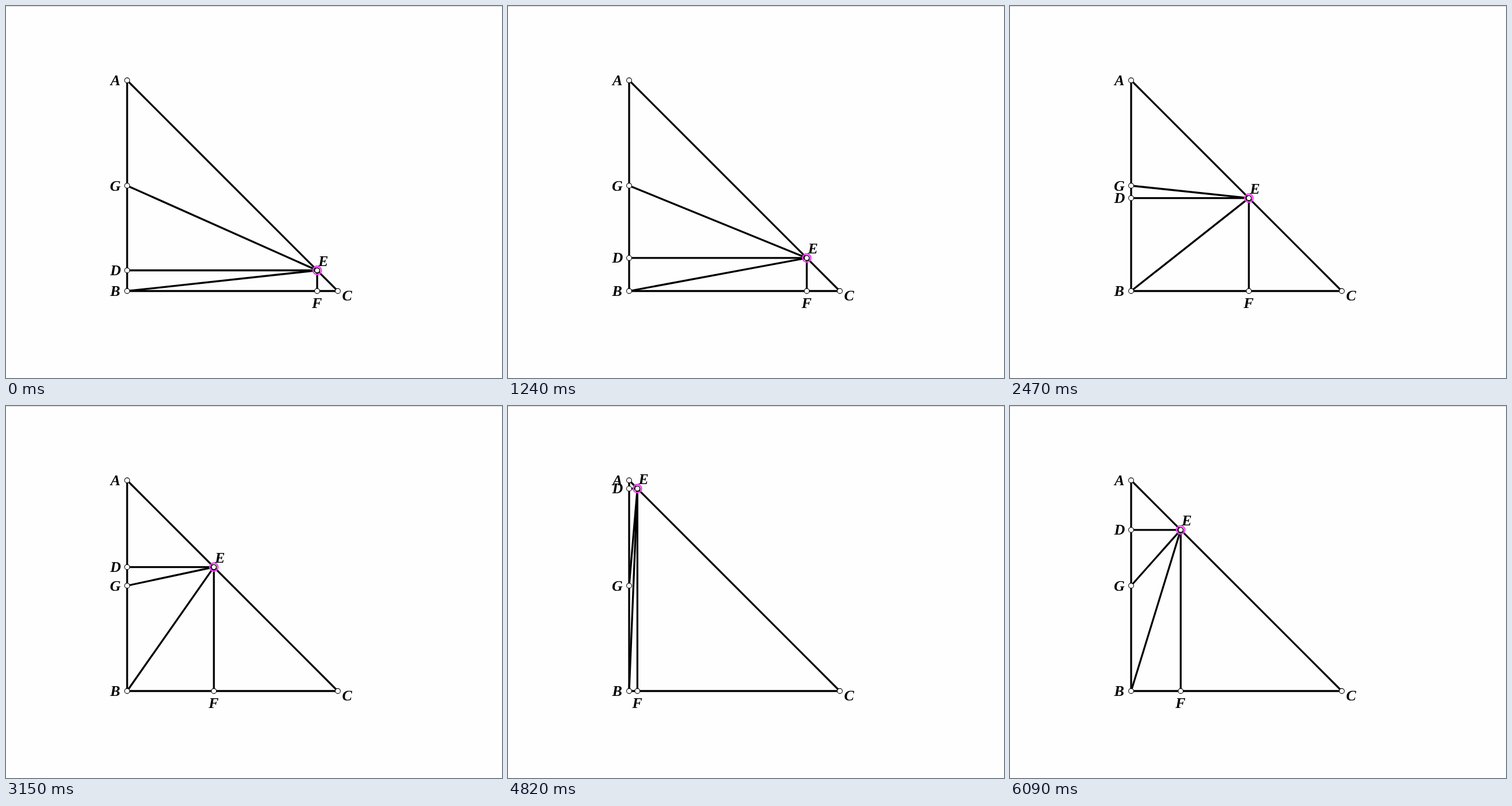
Animation, 864 px wide and 648 px high, one loop 6.17 s. Source, as an HTML page:

```html
<!DOCTYPE html>
<html lang="en">
<head>
<meta charset="utf-8">
<title>Moving point on a triangle</title>
<style>
  html, body { margin: 0; width: 100%; height: 100%; overflow: hidden; background: #fefefe; }
  svg { display: block; width: 864px; height: 648px; }
  line { stroke: #000; stroke-width: 3.3; stroke-linecap: round; }
  .dot { fill: #fff; stroke: #000; stroke-width: 1.1; }
  .ring { fill: none; stroke: #f53cf0; stroke-width: 2.4; }
  text { font: italic bold 26px "Liberation Serif", "Times New Roman", serif; fill: #000; }
</style>
</head>
<body>
<svg id="stage" viewBox="0 0 864 648">
  <rect width="864" height="1" fill="#d0d0d0"/>
</svg>
<script>
const LOOP = 6170, LEFT = 211, TOP = 129.5, SIDE = 367, DIVS = 102, START = 92;
const stage = document.getElementById("stage");

function add(tag, attrs, text) {
  const el = document.createElementNS("http://www.w3.org/2000/svg", tag);
  set(el, attrs);
  if (text) el.textContent = text;
  return stage.appendChild(el);
}

function set(el, attrs) {
  for (const key in attrs) el.setAttribute(key, attrs[key]);
}

// Nine runs of eight steps: first and last step time of each run
const runs = [[160, 760], [840, 1400], [1480, 2040], [2120, 2720], [2810, 3400],
  [3490, 4070], [4160, 4740], [4820, 5420], [5500, 6090]];
const stepTimes = runs.flatMap(([a, b]) =>
  Array.from({ length: 8 }, (_, j) => Math.round((a + (b - a) * j / 7) / 10) * 10));

// Step count against distance travelled, in divisions of the side
const pace = [[0, 0], [8, 14], [21, 39], [37, 70], [47, 89], [57, 108], [72, 136]];

function travelled(step) {
  const i = Math.max(1, pace.findIndex(p => p[0] >= step));
  const [s0, d0] = pace[i - 1], [s1, d1] = pace[i];
  return Math.round(d0 + (d1 - d0) * (step - s0) / (s1 - s0));
}

// The point runs to and fro between the ends of the hypotenuse
function offset(step) {
  const k = (START + travelled(step)) % (2 * DIVS);
  return SIDE / DIVS * (k > DIVS ? 2 * DIVS - k : k);
}

function points(d) {
  const bottom = TOP + SIDE;
  return {
    A: [LEFT, TOP],
    B: [LEFT, bottom],
    C: [LEFT + SIDE, bottom],
    G: [LEFT, TOP + SIDE / 2],
    D: [LEFT, TOP + d],
    F: [LEFT + d, bottom],
    E: [LEFT + d, TOP + d]
  };
}

const labelShift = {
  A: [-29, 8.5], B: [-29.5, 8.5], C: [7.5, 16], G: [-30, 8.5],
  D: [-29.5, 8.5], F: [-9, 29], E: [2, -8]
};

const names = Object.keys(labelShift);
const segments = ["AB", "BC", "AC", "GE", "DE", "BE", "EF"].map(s => [s, add("line", {})]);
const ring = add("circle", { class: "ring", r: 7.2 });
const dots = names.map(n => [n, add("circle", { class: "dot", r: 4.4 })]);
const labels = names.map(n => [n, add("text", {}, n)]);
set(dots.find(d => d[0] === "E")[1], { style: "stroke-width:1.6" });

function draw(ms) {
  const t = ms % LOOP;
  const p = points(offset(stepTimes.filter(s => s <= t).length));
  for (const [[a, b], el] of segments) {
    set(el, { x1: p[a][0], y1: p[a][1], x2: p[b][0], y2: p[b][1] });
  }
  for (const [n, el] of dots) set(el, { cx: p[n][0], cy: p[n][1] });
  set(ring, { cx: p.E[0], cy: p.E[1] });
  for (const [n, el] of labels) {
    set(el, { x: p[n][0] + labelShift[n][0], y: p[n][1] + labelShift[n][1] });
  }
}

const begin = performance.now();
function tick() {
  draw(performance.now() - begin);
  requestAnimationFrame(tick);
}
tick();
</script>
</body>
</html>
```
